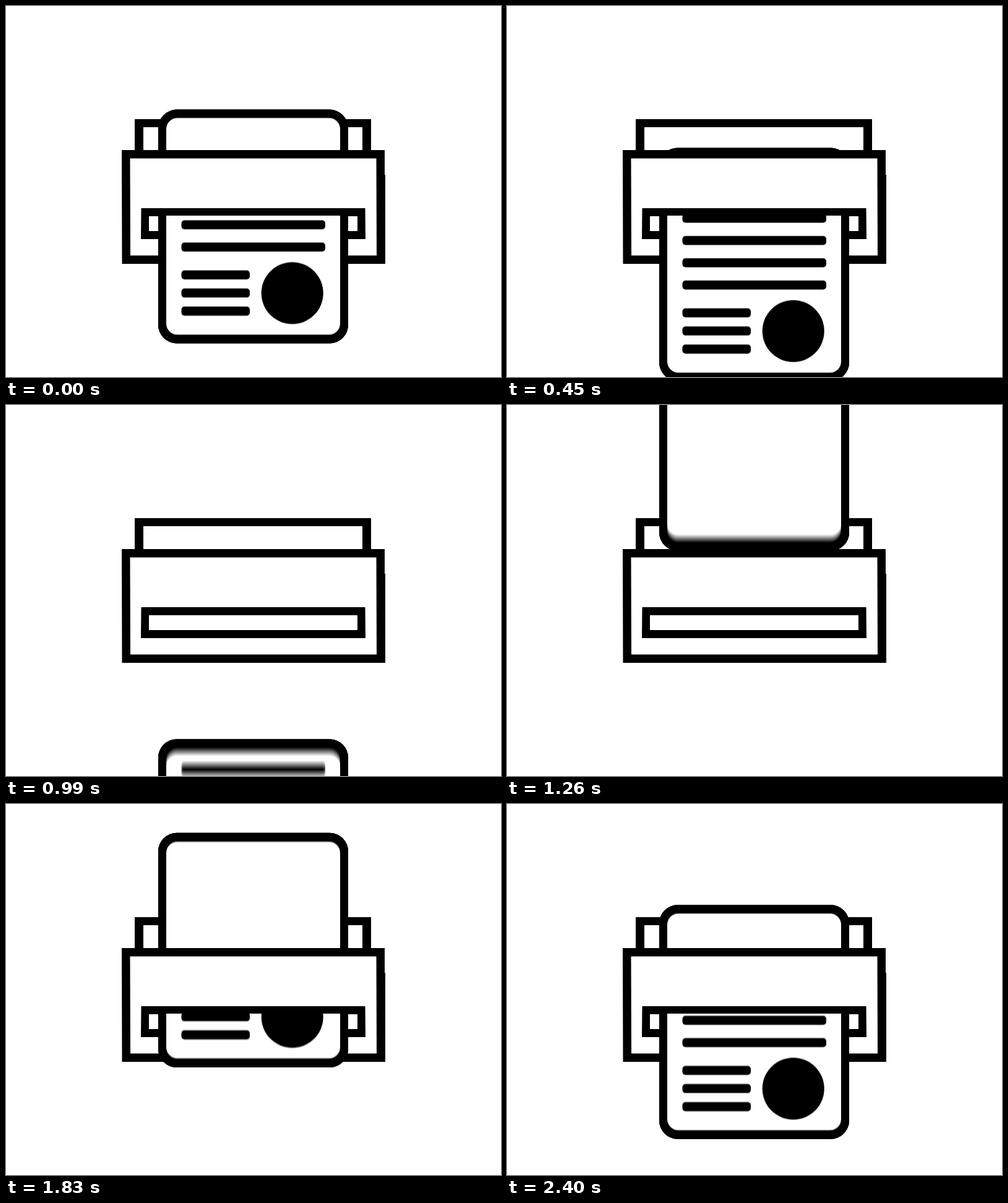
An HTML page with a canvas that plays this animation: 800x600 px, repeating every 2.43 s.

```html
<!DOCTYPE html>
<html lang="en">
<head>
<meta charset="utf-8">
<title>Printer</title>
<style>
  html, body { margin: 0; width: 100%; height: 100%; overflow: hidden; background: #fff; }
  canvas { display: block; }
</style>
</head>
<body>
<canvas id="stage" width="800" height="600"></canvas>
<script>
const stage = document.getElementById('stage').getContext('2d');
const LOOP = 2430, STEP = 30, SAMPLES = 14;

// The paper slows down at these [time, offset] stops between entering and leaving.
const stops = [[1485, -190], [1980, -100], [2475, 2.7], [2890, 61.8]];

function paperOffset(time) {
  const t = time < 1080 ? time + LOOP : time;
  const [first, last] = [stops[0], stops[stops.length - 1]];
  if (t < first[0]) return first[1] - 348 * ((first[0] - t) / 375) ** 2;
  if (t >= last[0]) return last[1] + 318 * ((t - last[0]) / 530) ** 2;
  const i = stops.findIndex(stop => t < stop[0]);
  const [t0, y0] = stops[i - 1], [t1, y1] = stops[i];
  const u = (t - t0) / (t1 - t0);
  return y0 + (y1 - y0) * u * u * (3 - 2 * u);
}

function box(ctx, color, left, top, right, bottom) {
  ctx.fillStyle = color;
  ctx.fillRect(left, top, right - left, bottom - top);
}

function rounded(ctx, color, left, top, right, bottom, radius) {
  ctx.fillStyle = color;
  ctx.beginPath();
  ctx.roundRect(left, top, right - left, bottom - top, radius);
  ctx.fill();
}

function polygon(ctx, color, ...points) {
  ctx.fillStyle = color;
  ctx.beginPath();
  points.forEach(([x, y]) => ctx.lineTo(x, y));
  ctx.fill();
}

// One sheet with a wide black surround, which the outline later trims.
function makeSheet(printed) {
  const canvas = document.createElement('canvas');
  canvas.width = 800;
  canvas.height = 700;
  const ctx = canvas.getContext('2d');
  const bar = (y, right) => rounded(ctx, '#000', 283.5, y - 7.3, right, y + 7.3, 5);
  box(ctx, '#000', 0, 0, 800, 700);
  rounded(ctx, '#fff', 259, 180.7, 540, 531.3, 18);
  if (printed) {
    for (let i = 0; i < 6; i++) bar(209.5 + 36 * i, 516);
    for (let i = 0; i < 3; i++) bar(434.5 + 29.3 * i, 394);
    ctx.beginPath();
    ctx.arc(462.7, 464, 50, 0, 2 * Math.PI);
    ctx.fill();
  }
  return canvas;
}

const blankSheet = makeSheet(false), printedSheet = makeSheet(true);

// Crisp outline; the inside is averaged over the shutter time.
function paper(sheet, y, blur, clipTop, clipBottom) {
  stage.save();
  stage.beginPath();
  stage.rect(0, clipTop, 800, clipBottom - clipTop);
  stage.clip();
  stage.beginPath();
  stage.roundRect(246, 167.9 + y - blur / 2, 307, 376.6 + blur, 30);
  stage.clip();
  for (let i = 0; i < SAMPLES; i++) {
    stage.globalAlpha = 1 / (i + 1);
    stage.drawImage(sheet, 0, y + blur * ((i + 0.5) / SAMPLES - 0.5));
  }
  stage.restore();
}

function draw(time) {
  const y = paperOffset(time);
  const speed = paperOffset((time + 15) % LOOP) - paperOffset((time - 15 + LOOP) % LOOP);
  const blur = Math.min(20, Math.abs(speed) * 0.4);

  box(stage, '#fff', 0, 0, 800, 600);
  box(stage, '#000', 208, 183, 590, 240);
  box(stage, '#fff', 222, 196, 576, 240);
  paper(blankSheet, y, blur, 0, 234);

  polygon(stage, '#000', [187, 233], [612, 233], [612, 273], [613, 273], [613, 417], [187.5, 417]);
  polygon(stage, '#fff', [200.5, 246.5], [598.5, 246.5], [599, 403.5], [201, 403.5]);
  polygon(stage, '#000', [218.5, 327], [580.5, 327], [581, 377], [218, 377]);
  box(stage, '#fff', 231, 340, 568, 364);
  paper(printedSheet, y, blur, 339, 600);
}

function frame(now) {
  draw(Math.floor((now % LOOP) / STEP) * STEP);
  requestAnimationFrame(frame);
}
requestAnimationFrame(frame);
</script>
</body>
</html>
```
